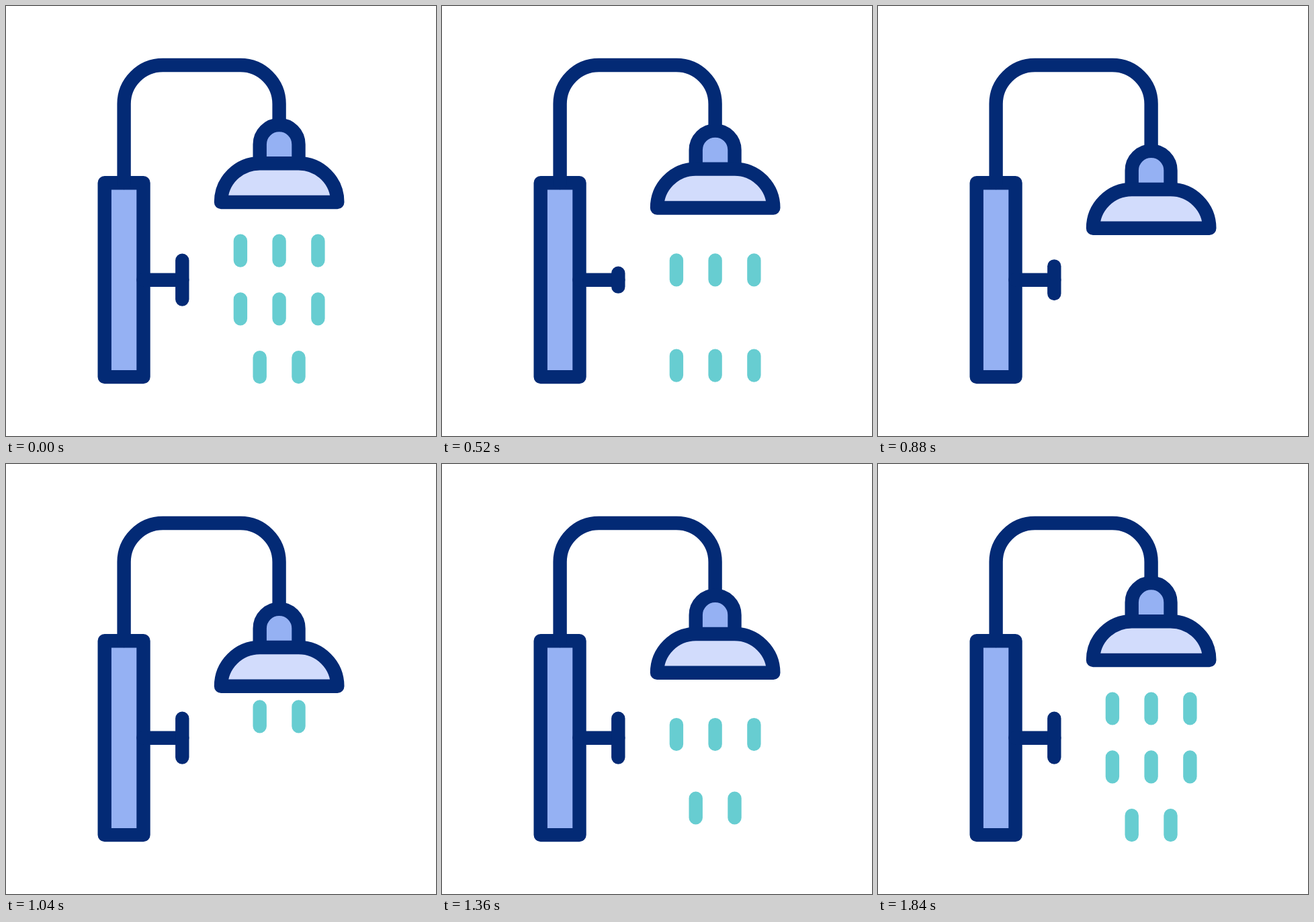
Animation of 640 by 640 pixels, one loop 1920 ms. Source, as an HTML page:

```html
<!DOCTYPE html>
<html lang="en">
<head>
<meta charset="utf-8">
<title>Shower</title>
<style>
  html, body { margin: 0; width: 100%; height: 100%; overflow: hidden; background: #fff; }
  svg { display: block; width: 100%; height: 100%; }
  g { stroke-linecap: round; stroke-linejoin: round; stroke-width: 20.4; }
  .line { stroke: #032a75; fill: none; }
  .water { stroke: #67cdd1; fill: none; }
  .mid { fill: #95b1f3; }
  .pale { fill: #d2dcfc; }
</style>
</head>
<body>
<svg viewBox="0 0 640 640">
  <clipPath id="below"><rect id="mask" x="300" y="292" width="220" height="400"/></clipPath>
  <g class="water" clip-path="url(#below)">
    <path class="row"/>
    <path class="row"/>
    <path class="row"/>
  </g>
  <g class="line">
    <rect class="mid" x="146.7" y="263.3" width="57.8" height="288.8"/>
    <path d="M204.5 407.7H262.3"/>
    <path id="knob"/>
    <path id="pipe"/>
    <g id="head">
      <path class="mid" d="M377.7 234V205.9A28.9 28.9 0 0 1 435.5 205.9V234"/>
      <path class="pale" d="M320 292A57.8 57.8 0 0 1 377.7 234.2H435.5A57.8 57.8 0 0 1 493.3 292Z"/>
    </g>
  </g>
</svg>
<script>
const LOOP = 1920, STEP = 40;
const $ = id => document.getElementById(id);
const rowPaths = document.querySelectorAll('.row');

// Each row leaves at `out` and settles at `rest`.
const rows = [
  { y: 364.2, xs: [348.9, 406.6, 464.4], out: 307, rest: 1893 },
  { y: 450.9, xs: [348.9, 406.6, 464.4], out: 192, rest: 1774 },
  { y: 537.6, xs: [377.7, 435.5], out: 77, rest: 1687 }
];

function ease(t, start, end) {
  const u = Math.min(1, Math.max(0, (t - start) / (end - start)));
  return u * u * (3 - 2 * u);
}

function dropY(row, t) {
  if (t < 860) return row.y + 150 * Math.pow(Math.max(0, t - row.out) / 413, 2.5);
  return row.y - 117 * Math.pow(Math.max(0, row.rest - t) / 574, 2.7);
}

function draw(t) {
  const dip = 38.8 * (ease(t, 376, 854) - ease(t, 1114, 1596));
  $('head').setAttribute('transform', `translate(0 ${dip})`);
  $('mask').setAttribute('y', 292 + dip);
  $('pipe').setAttribute('d',
    `M175.6 263V145.8A57.8 57.8 0 0 1 233.4 88H348.8A57.8 57.8 0 0 1 406.6 145.8V${177 + dip}`);

  const half = 28.9 - 24.5 * (ease(t, 247, 642) - ease(t, 642, 1037));
  $('knob').setAttribute('d', `M262.3 ${407.7 - half}v${2 * half}`);

  rows.forEach((row, i) => {
    const top = dropY(row, t) - 14.4;
    rowPaths[i].setAttribute('d', row.xs.map(x => `M${x} ${top}v28.8`).join(''));
  });
}

const begin = performance.now();
function tick() {
  const t = (performance.now() - begin) % LOOP;
  draw(Math.floor(t / STEP) * STEP);
  requestAnimationFrame(tick);
}
tick();
</script>
</body>
</html>
```
